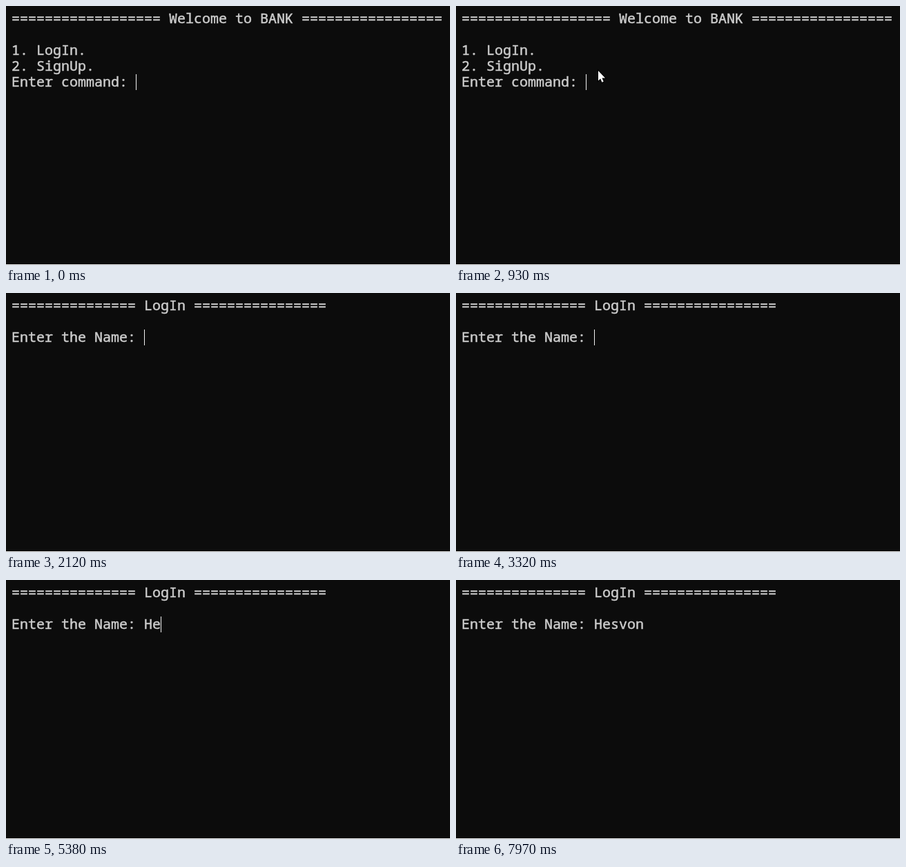
Animation, 643 px wide and 376 px high, one loop 8000 ms. Source, as an HTML page:

```html
<!DOCTYPE html>
<html lang="en">
<head>
<meta charset="utf-8">
<title>Terminal login</title>
<style>
  html, body { margin: 0; width: 100%; height: 100%; overflow: hidden; background: #0c0c0c; }
  svg { display: block; width: 643px; height: 376px; }
  text {
    font: 20px "Noto Sans Mono", "DejaVu Sans Mono", monospace;
    font-variant-ligatures: none;
    white-space: pre;
    fill: #ccc;
    stroke: #ccc;
    stroke-width: 0.5px;
  }
</style>
</head>
<body>
<svg viewBox="0 0 643 376">
  <rect width="643" height="376" fill="#0c0c0c"/>
  <rect y="375" width="643" height="1" fill="#f0f0f0"/>
  <g id="lines"></g>
  <rect id="caret" width="1" height="23" fill="#f2f2f2"/>
  <path id="pointer" d="M0 0V14.4L3.2 11.4L5.4 16.8L7.7 15.8L5.5 10.5H10Z"
        fill="#fff" stroke="#000" stroke-width="2" paint-order="stroke"/>
</svg>
<script>
const LOOP = 8000, LEFT = 8, TOP = 7, CELL = 12, ROW = 23, BASELINE = 18;
const SVG = "http://www.w3.org/2000/svg";
const $ = id => document.getElementById(id);
const bar = n => "=".repeat(n);

const menu = [`${bar(18)} Welcome to BANK ${bar(17)}`, "", "1. LogIn.", "2. SignUp.", "Enter command: "];
const login = [`${bar(15)} LogIn ${bar(16)}`, "", "Enter the Name: "];

// start time, screen, typed text, caret visible
const states = [
  [0, menu, "", true], [190, menu, "", false], [720, menu, "", true],
  [1250, menu, "", false], [1790, menu, "", true], [1850, menu, "1", true],
  [2120, login, "", true], [2780, login, "", false], [3320, login, "", true],
  [3850, login, "", false], [4380, login, "", true], [5050, login, "", false],
  [5190, login, "H", true], [5380, login, "He", true], [5650, login, "Hesb", true],
  [6180, login, "Hes", true], [6780, login, "Hes", false], [6910, login, "Hesv", true],
  [7110, login, "Hesvo", true], [7370, login, "Hesvon", true], [7970, login, "Hesvon", false]
];

const rows = menu.map((_, i) => {
  const row = document.createElementNS(SVG, "text");
  row.setAttribute("x", LEFT);
  row.setAttribute("y", TOP + i * ROW + BASELINE);
  return $("lines").appendChild(row);
});

const mix = (a, b, u) => a + (b - a) * u;
const easeOut = u => 1 - (1 - u) ** 2;

// Pointer tip, or null while hidden
function pointerAt(t) {
  if (t < 330 || t >= 1850) return null;
  if (t >= 1190 && t < 1390) return [210, 77];
  const u = Math.min(9, Math.floor((t - 330) * 9 / 600 + 1e-6)) / 9;
  const x = mix(469, 206, easeOut(u));
  const y = u < 0.75 ? mix(296, 74, easeOut(u / 0.75)) : mix(74, 94, (u - 0.75) * 4);
  return [Math.round(x), Math.round(y)];
}

function draw(t) {
  const [, screen, typed, caretOn] = states.findLast(s => s[0] <= t);
  const last = screen.length - 1;
  rows.forEach((row, i) => {
    const line = (screen[i] || "") + (i === last ? typed : "");
    if (row.textContent !== line) row.textContent = line;
  });

  const caret = $("caret");
  caret.setAttribute("x", LEFT + (screen[last] + typed).length * CELL);
  caret.setAttribute("y", TOP + last * ROW);
  caret.setAttribute("visibility", caretOn ? "visible" : "hidden");

  const tip = pointerAt(t);
  $("pointer").setAttribute("visibility", tip ? "visible" : "hidden");
  if (tip) $("pointer").setAttribute("transform", `translate(${tip})`);
}

const start = performance.now();
function tick(now) {
  draw(Math.max(0, now - start) % LOOP);
  requestAnimationFrame(tick);
}
draw(0);
requestAnimationFrame(tick);
</script>
</body>
</html>
```
